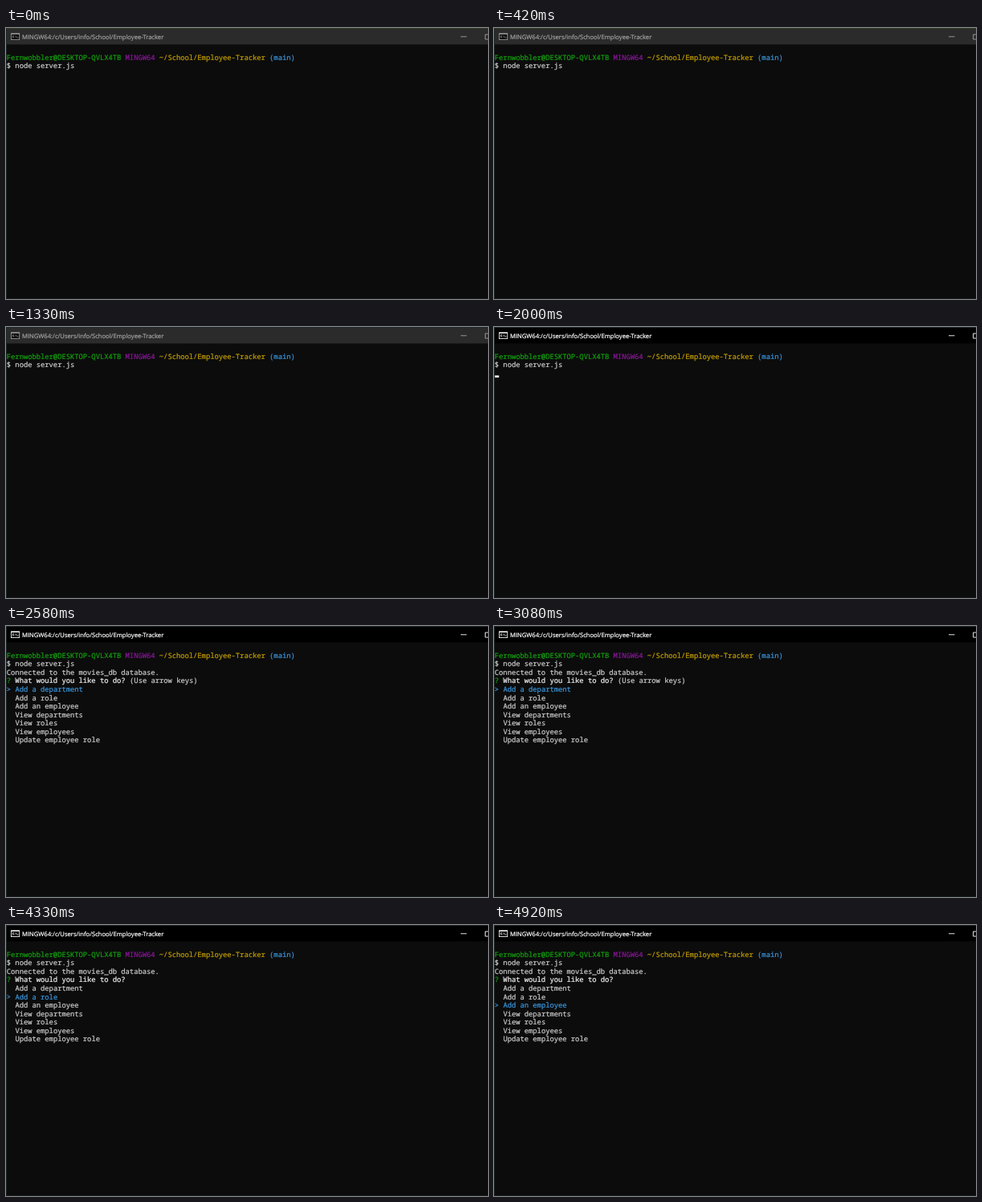
An HTML page that plays this animation: 600x338 px, repeating every 5000 ms.

```html
<!DOCTYPE html>
<html lang="en">
<head>
<meta charset="utf-8">
<title>Employee tracker in a terminal</title>
<style>
  html, body { margin: 0; width: 100%; height: 100%; overflow: hidden; background: #0c0c0c; }
  svg { display: block; width: 600px; height: 338px; }
  text { white-space: pre; text-rendering: geometricPrecision; }
  text, tspan { fill: currentColor; stroke: currentColor; stroke-width: .22px; }
  .term { font: 500 8.81px "Noto Sans Mono", "DejaVu Sans Mono", monospace; color: #ccc; }
  .title { font: 7.63px "Open Sans", "Noto Sans", sans-serif; }
  .green { color: #13a10e; }
  .purple { color: #881798; }
  .gold { color: #c19c00; }
  .blue { color: #3a96dd; }
  .bright { color: #f2f2f2; }

  .bar, .chrome, .edge, .cursor, .menu, .hint, .pointer, .item {
    animation: 5s step-end infinite;
  }
  .bar { animation-name: bar; }
  .chrome { animation-name: chrome; }
  .edge { animation-name: edge; }
  .cursor { animation-name: cursor; }
  .menu { animation-name: menu; }
  .hint { animation-name: hint; }
  .pointer { animation-name: pointer; }
  .first { animation-name: first; }
  .second { animation-name: second; }
  .third { animation-name: third; }

  /* the window gains focus */
  @keyframes bar { 0% { fill: #2b2b2b; } 31.6%, 100% { fill: #000; } }
  @keyframes chrome { 0% { color: #a0a0a0; } 31.6%, 100% { color: #fff; } }
  @keyframes edge {
    0% { fill: #2c3a24; }
    13.4% { fill: #1d2a2b; }
    71.6% { fill: #33291a; }
    81.6%, 100% { fill: #1d2a2b; }
  }

  @keyframes cursor {
    0% { visibility: hidden; }
    35% { visibility: visible; }
    45.6%, 100% { visibility: hidden; }
  }
  @keyframes menu { 0% { opacity: 0; } 48.4%, 100% { opacity: 1; } }

  /* arrow key presses */
  @keyframes hint { 0% { opacity: 1; } 85%, 100% { opacity: 0; } }
  @keyframes pointer {
    0% { transform: translateY(0); }
    85% { transform: translateY(10.55px); }
    95%, 100% { transform: translateY(21.1px); }
  }
  @keyframes first { 0% { color: #3a96dd; } 85%, 100% { color: #ccc; } }
  @keyframes second { 0% { color: #ccc; } 85% { color: #3a96dd; } 95%, 100% { color: #ccc; } }
  @keyframes third { 0% { color: #ccc; } 95%, 100% { color: #3a96dd; } }
</style>
</head>
<body>
<svg viewBox="0 0 600 338">
  <rect width="600" height="338" fill="#0c0c0c"/>
  <rect class="bar" width="600" height="20.5"/>

  <!-- desktop showing around the window -->
  <rect class="edge" width="600" height="1"/>
  <rect y="1" width="1" height="337" fill="#1b2725"/>
  <rect y="337" width="600" height="1" fill="#141a1a"/>

  <g class="chrome">
    <rect x="6.5" y="7" width="10.2" height="7.6" fill="#080808" stroke="currentColor" stroke-width=".8"/>
    <path d="M6.2 7.4h10.8" stroke="currentColor" stroke-width="1.2"/>
    <path d="M10 9.8h-1.6v1.8h1.6M11.2 10v.5M11.2 11.2v.5M12.3 9.6l1 2.2M13.6 12h1.8"
          fill="none" stroke="currentColor" stroke-width=".7"/>
    <text class="title" x="20" y="13.6">MINGW64:/c/Users/info/School/Employee-Tracker</text>
    <path d="M566 10.8h7.4M600 8.1h-3.4v6h3.4" fill="none" stroke="currentColor" stroke-width=".9"/>
  </g>

  <g class="term">
    <text x=".8" y="39.8"><tspan class="green">Fernwobbler@DESKTOP-QVLX4TB</tspan> <tspan class="purple">MINGW64</tspan> <tspan class="gold">~/School/Employee-Tracker</tspan> <tspan class="blue">(main)</tspan></text>
    <text x=".8" y="50.35">$ node server.js</text>
    <rect class="cursor" x="1" y="60.4" width="5.2" height="2.6" fill="#f2f2f2"/>

    <g class="menu">
      <text x=".8" y="60.9">Connected to the movies_db database.</text>
      <text x=".8" y="71.45"><tspan class="green">?</tspan> <tspan class="bright">What would you like to do?</tspan></text>
      <text class="hint" x="154.1" y="71.45">(Use arrow keys)</text>
      <text class="pointer blue" x=".8" y="82">&gt;</text>
      <text class="item first" x="11.4" y="82">Add a department</text>
      <text class="item second" x="11.4" y="92.55">Add a role</text>
      <text class="item third" x="11.4" y="103.1">Add an employee</text>
      <text x="11.4" y="113.65">View departments</text>
      <text x="11.4" y="124.2">View roles</text>
      <text x="11.4" y="134.75">View employees</text>
      <text x="11.4" y="145.3">Update employee role</text>
    </g>
  </g>
</svg>
</body>
</html>
```
